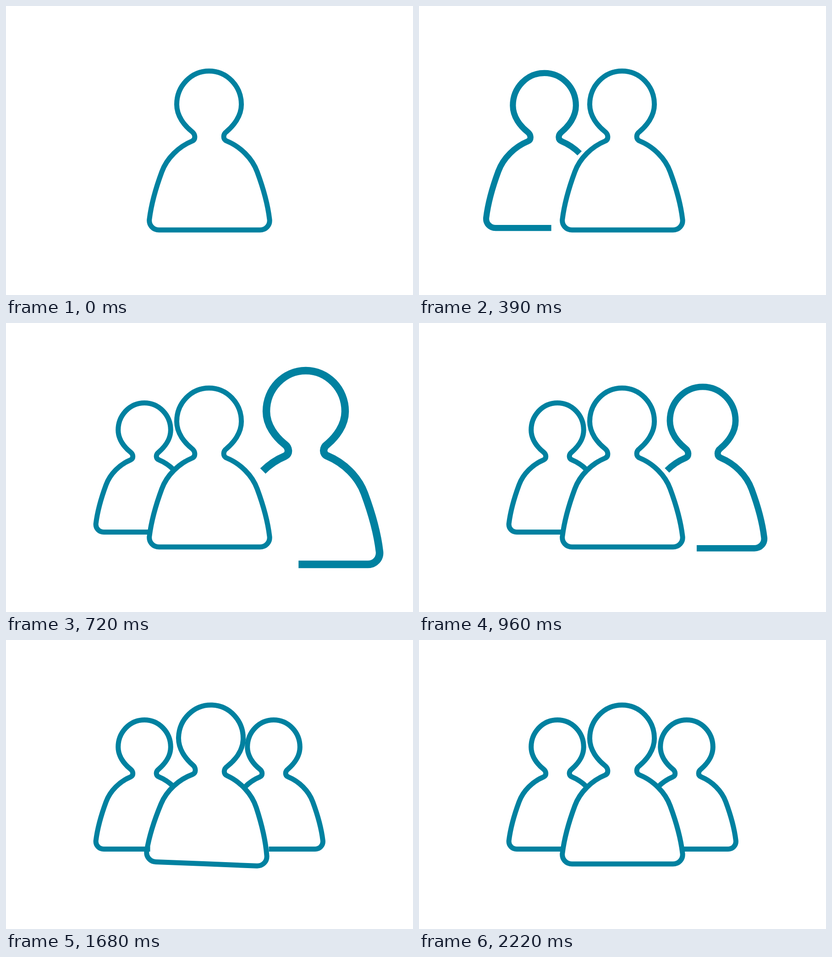
Write an HTML page that moves like this. It is 888 px wide and 631 px high and loops after 8000 ms.

```html
<!DOCTYPE html>
<html lang="en">
<head>
<meta charset="utf-8">
<title>Group of people</title>
<style>
  html, body { margin: 0; width: 100%; height: 100%; overflow: hidden; background: #fff; }
  svg { display: block; width: 100vw; height: 100vh; }
  path { fill: none; stroke: #0081a0; stroke-width: 11; }
</style>
</head>
<body>
<svg viewBox="0 0 888 631">
  <g id="left"><path></path></g>
  <g id="right"><path></path></g>
  <g id="center"><path></path></g>
</svg>
<script>
const LOOP = 8000, STEP = 30;
const CX = 444, CY = 315.5;
const SIDE_SCALE = 0.8127;

// Outline pieces, clockwise from the base line
const leftSide = "H334C321 489 311.5 478.5 312.8 466C317 432 327 397 340 362C345.5 347 354.75 333.25 366.25 321.75";
const leftShoulder = "C377.75 310.25 391.5 301 406 295";
const head = "C415 291 412.5 279.5 406 274.5C389 261 372.5 240 372.5 215C372.5 174.7 404.1 142 443 142" +
  "C481.9 142 513.5 174.7 513.5 215C513.5 240 497 261 481 274.5C474 279.5 472 291 482 295";
const rightShoulder = "C496.5 301 510.25 310.25 521.75 321.75";
const rightSide = "C533.25 333.25 542.5 347 548 362C561 397 571 432 575 466C576.5 478.5 567 489 554 489";

const $ = id => document.getElementById(id);
const clamp01 = v => Math.min(1, Math.max(0, v));

function setSide(id, headX, d) {
  const path = $(id).firstElementChild;
  path.setAttribute("d", d);
  path.setAttribute("transform",
    `translate(${headX} 174.5) scale(${SIDE_SCALE}) translate(-443 -142)`);
  path.style.strokeWidth = 11 / SIDE_SCALE;
}

$("center").firstElementChild.setAttribute("d",
  "M444 489" + leftSide + leftShoulder + head + rightShoulder + rightSide + "Z");
setSide("left", 302, "M458.4 489" + leftSide + leftShoulder + head + rightShoulder);
setSide("right", 584, "M366.25 321.75" + leftShoulder + head + rightShoulder + rightSide + "H430.1");

// Appears at 1.5 times its size and shrinks toward the stage centre
function zoomIn(id, t, start, end) {
  const scale = 1.5 - 0.5 * clamp01((t - start) / (end - start));
  $(id).setAttribute("visibility", t < start ? "hidden" : "visible");
  $(id).setAttribute("transform",
    `translate(${CX} ${CY}) scale(${scale}) translate(${-CX} ${-CY})`);
}

// Leans right, then left, then upright, 240 ms each
function teeter(t) {
  const p = 3 * clamp01((t - 1500) / 720);
  return 3 * (p < 1 ? p : p < 2 ? 3 - 2 * p : p - 3);
}

function draw(time) {
  const t = Math.floor((time % LOOP + 0.01) / STEP) * STEP;
  zoomIn("left", t, 30, 630);
  zoomIn("right", t, 720, 1200);
  $("center").setAttribute("transform", `rotate(${teeter(t)} ${CX} ${CY})`);
}

let origin;
function tick(now) {
  origin ??= now;
  draw(now - origin);
  requestAnimationFrame(tick);
}
draw(0);
requestAnimationFrame(tick);
</script>
</body>
</html>
```
